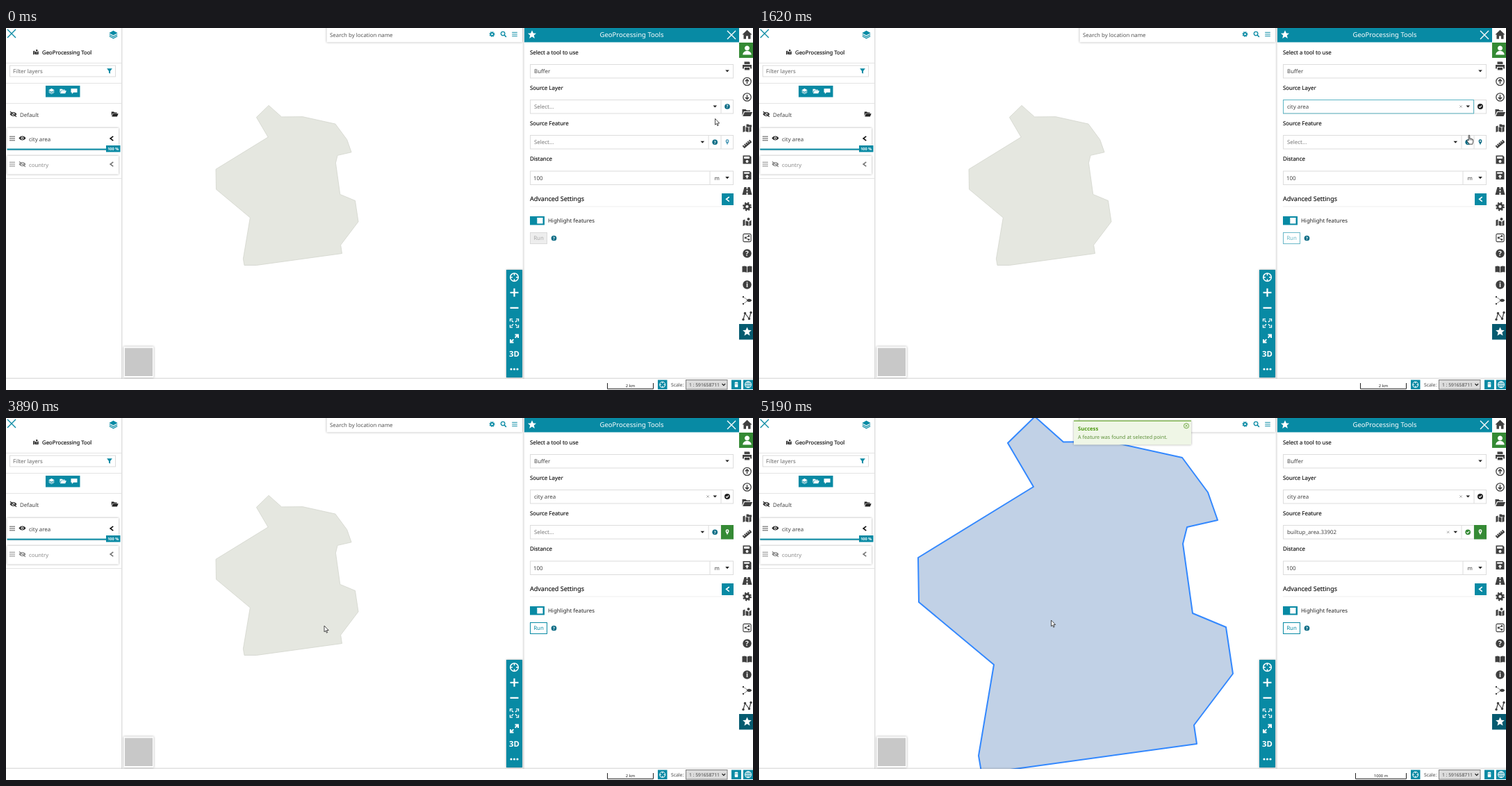
Animation, 1075 px wide and 521 px high, one loop 5.79 s. Source, as an HTML page:

```html
<!DOCTYPE html>
<html lang="en">
<head>
<meta charset="utf-8">
<title>GeoProcessing Tools</title>
<style>
html, body { margin: 0; width: 100%; height: 100%; overflow: hidden; background: #fff; }
svg { display: block; width: 1075px; height: 521px; }
text { font-family: "Noto Sans", "Open Sans", sans-serif; text-rendering: geometricPrecision; }
.soft { filter: drop-shadow(0 .5px 1.5px rgba(0,0,0,.35)); }
</style>
</head>
<body>
<svg id="stage" viewBox="0 0 1075 521"></svg>
<script>
const LOOP = 5790;
const TEAL = '#088aa4', DEEP = '#0b6c85', GREEN = '#358a35', INK = '#404040', EDGE = '#dcdcdc';

const line = (d, w = 1.4) => `<path d="${d}" fill="none" stroke-width="${w}"/>`;
const fill = d => `<path d="${d}"/>`;
const ring = (r, w, extra = '') => `<circle r="${r}" fill="none" stroke-width="${w}" ${extra}/>`;
const glyph = ch => `<text y="3.6" font-size="10" font-weight="700" text-anchor="middle" fill="#fff">${ch}</text>`;

const EYE = 'M-5 0C-2.5-4 2.5-4 5 0 2.5 4-2.5 4-5 0Z';
const FOLDS = 'M-6-3L-3-4V4.5L-6 5.5ZM-2-2L2-1V5.5L-2 4.5ZM3-1L6-3V4.5L3 5.5Z';
const UP = ring(5.7, 1.3) + line('M0 3.2V-3M-2.6-.4L0-3 2.6-.4', 1.5);
const icons = {
  home: fill('M-7 0L0-6.8 7 0H5V6.3H1.5V2H-1.5V6.3H-5V0Z'),
  user: fill('M0-6.5a3.5 3.5 0 1 1-.01 0ZM-6.2 6.5C-6.2-1 6.2-1 6.2 6.5Z'),
  print: fill('M-4-6H3L4-5V-2.4H-4ZM-6.5-1.6H6.5V4H4.6V1.6H-4.6V4H-6.5ZM-3.6 2.6H3.6V6H-3.6Z'),
  up: UP,
  down: `<g transform="rotate(180)">${UP}</g>`,
  folder: fill('M-7 4V-5H-2L-.5-3.5H4.5V-2H-4.5ZM-6.3 5L-3.6-1H7.6L5 5Z'),
  map: fill(FOLDS) + '<circle cx="2" cy="-4.4" r="2"/>',
  mapFolder: fill(FOLDS) + fill('M-1-6H2L3-5H6.5V-2H-1Z'),
  ruler: '<g transform="rotate(-40)">' + fill('M-7-2.3H7V2.3H-7Z') +
    '<path d="M-4.5-2.3V0M-1.5-2.3V0M1.5-2.3V0M4.5-2.3V0" stroke="#fff" stroke-width="1"/></g>',
  save: fill('M-6-6H4L6-4V6H-6ZM-4.3-4.6V-1.4H3.4V-4.6ZM0 .6a2 2 0 1 0 .01 0Z'),
  saveUp: fill('M-6-6H4L6-4V6H-6ZM-4.3-4.6V-2.2H3.4V-4.6ZM0-.8L-3 2H-1V4.6H1V2H3Z'),
  road: fill('M-4-5.5H-.9V-3H.9V-5.5H4L7 5.5H1V2.5H-1V5.5H-7ZM-.8-1.5V1H.8V-1.5Z'),
  gear: ring(3.5, 2.8) + ring(5.5, 1.9, 'stroke-dasharray="2.3 2.02"'),
  share: '<rect x="-5.6" y="-5.6" width="11.2" height="11.2" rx="1.6" fill="none" stroke-width="1.1"/>' +
    line('M2.4-2.6L-2.4 0 2.4 2.6', .9) + '<circle cx="2.4" cy="-2.6" r="1.4"/><circle cx="-2.4" r="1.4"/><circle cx="2.4" cy="2.6" r="1.4"/>',
  help: '<circle r="6.2"/>' + glyph('?'),
  info: '<circle r="6.2"/>' + glyph('i'),
  book: fill('M-7-4C-4-5-2-4.5-.4-3.5V5C-2 4-4 4-7 4.5ZM7-4C4-5 2-4.5 .4-3.5V5C2 4 4 4 7 4.5Z'),
  sight: '<path d="M-5.5-5L0-1M-5.5 5L0 1" fill="none" stroke-width="1" stroke-dasharray="1.6 1"/>' +
    '<circle cx="-5.5" cy="-5" r="1.2"/><circle cx="-5.5" cy="5" r="1.2"/><g transform="translate(3) scale(.75)">' + fill(EYE) + '</g>',
  nodes: line('M-5.5 5L-3-4 3 4 5.5-5', 1.2) +
    [[-5.5, 5], [-3, -4], [3, 4], [5.5, -5]].map(([x, y]) => `<circle cx="${x}" cy="${y}" r="1.7"/>`).join(''),
  star: fill('M0-6.5L1.9-2.2 6.4-1.9 2.9 1.1 4 5.7 0 3.2-4 5.7-2.9 1.1-6.4-1.9-1.9-2.2Z'),
  eye: fill(EYE + 'M0-2a2 2 0 1 0 .01 0ZM0-1a1 1 0 1 1-.01 0Z'),
  eyeOff: fill(EYE + 'M0-2a2 2 0 1 0 .01 0Z') + line('M-4.5-3.8L4.5 3.8', 1.2),
  bars: line('M-4-2.8H4M-4 0H4M-4 2.8H4', 1),
  cross: line('M-6-6L6 6M6-6L-6 6', 1.4),
  back: line('M2.4-3.4L-2 0 2.4 3.4', 1.7),
  caret: fill('M-2.8-1.5H2.8L0 1.6Z'),
  caretUp: fill('M-2.8 1.5H2.8L0-1.6Z'),
  check: '<circle r="6.2"/><path d="M-3 0L-.8 2.3 3.2-2" fill="none" stroke="#fff" stroke-width="1.8"/>',
  pin: fill('M0 4.6C-.6 1.8-2.7.5-2.7-1.7a2.7 2.7 0 0 1 5.4 0C2.7.5.6 1.8 0 4.6ZM0-2.7a1 1 0 1 0 .01 0Z'),
  layers: fill('M0-6L6.5-2.5 0 1-6.5-2.5Z') + line('M-6 0L0 3.2 6 0M-6 2.4L0 5.6 6 2.4', 1.2),
  funnel: fill('M-4.5-4.5H4.5L1.2 0V4.5L-1.2 3V0Z'),
  bubble: fill('M-5-3.5H5V2.5H-1L-3.5 5V2.5H-5Z'),
  lens: '<circle cx="-1" cy="-1" r="3.1" fill="none" stroke-width="1.4"/>' + line('M1.3 1.3L4.3 4.3', 1.7),
  aim: ring(5.8, 1.5) + line('M0-5.8V-2.5M0 5.8V2.5M-5.8 0H-2.5M5.8 0H2.5', 1.5),
  plus: line('M-6 0H6M0-6V6', 2.2),
  minus: line('M-6 0H6', 2.2),
  fit: line('M-6-2.5V-6H-2.5M2.5-6H6V-2.5M6 2.5V6H2.5M-2.5 6H-6V2.5M-4-4L-1.5-1.5M4-4L1.5-1.5M4 4L1.5 1.5M-4 4L-1.5 1.5', 1.4),
  expand: line('M1-5.5H5.5V-1M-1 5.5H-5.5V1M5-5L1.2-1.2M-5 5L-1.2 1.2', 2),
  dots: '<circle cx="-4.5" r="1.6"/><circle r="1.6"/><circle cx="4.5" r="1.6"/>',
  globe: ring(4.4, 1.1) + line('M-4.4 0H4.4M0-4.4V4.4M0-4.4C-3-2-3 2 0 4.4 3 2 3-2 0-4.4', .8)
};

const icon = (name, x, y, s = 1, c = INK) =>
  `<g transform="translate(${x} ${y}) scale(${s})" fill="${c}" stroke="${c}" stroke-width="0" fill-rule="evenodd">${icons[name]}</g>`;
const box = (x, y, x2, y2, f = '#fff', s = 'none', extra = '') =>
  `<rect x="${x}" y="${y}" width="${x2 - x}" height="${y2 - y}" fill="${f}" stroke="${s}" ${extra}/>`;
const label = (x, y, s, size = 7.9, c = '#444', extra = '') =>
  `<text x="${x}" y="${y + size * .35}" font-size="${size}" fill="${c}" ${extra}>${s}</text>`;
const strong = (x, y, s, size = 7.9) => label(x, y, s, size, '#111', 'stroke="#111" stroke-width=".15"');
const rule = (x, y, x2, y2, c = '#e4e4e4', w = 1) => `<path d="M${x} ${y}L${x2} ${y2}" stroke="${c}" stroke-width="${w}"/>`;
const layer = (id, s) => `<g id="${id}">${s}</g>`;
const MID = 'text-anchor="middle"', SOFT = 'class="soft"';

const area = 'M397-2L438 34.5 505 34 609 57 646 107 660 147 616 157 610 181 624 281 672 301 682 368 626 442 630 469 358 506.5 319.5 506.5 316 486 338 355 230 265 229 201 395 99 358 36Z';

const map =
  layer('far', `<path d="${area}" transform="translate(198.4 112.3) scale(.4525)" fill="#e5e7e0" stroke="#d3d5cd" stroke-width="1.8"/>`) +
  layer('near', `<path d="${area}" fill="#c1d1e6" stroke="#3388ff" stroke-width="2" stroke-linejoin="round"/>`) +
  box(169.5, 458.5, 212.5, 503, '#fff', 'none', SOFT) + box(171, 460.5, 211, 501, '#c8c8c8');

const search = box(461.5, -3, 743, 20.5, '#fff', 'none', SOFT) +
  label(466, 10, 'Search by location name', 7.9, '#555') +
  icon('gear', 699.5, 9, .62, TEAL) + icon('lens', 716, 9, .9, TEAL) + icon('bars', 732, 9, .95, TEAL);

const tools = layer('loadTile', box(720, 326, 743, 349, TEAL) +
    '<g transform="translate(731.5 338)"><g id="dots" fill="#fff">' +
    [0, 1, 2, 3, 4, 5].map(i => {
      const a = 1.6 + i * .5;
      return `<circle cx="${(6 * Math.cos(a)).toFixed(2)}" cy="${(6 * Math.sin(a)).toFixed(2)}" r="${.6 + i * .14}"/>`;
    }).join('') + '</g></g>') +
  box(720, 348, 743, 503, TEAL, 'none', SOFT) +
  ['aim', 'plus', 'minus', 'fit', 'expand', '', 'dots'].map((n, i) => n && icon(n, 731.5, 358.7 + i * 22.05, 1, '#fff')).join('') +
  label(731.5, 469, '3D', 11.3, '#fff', MID + ' font-weight="700"');

const left = box(-5, -5, 166, 505, '#fff', 'none', SOFT) +
  icon('cross', 8, 8, 1, TEAL) + icon('layers', 154.5, 9.5, .95, TEAL) +
  icon('map', 43, 35, .62, '#222') + strong(52, 35.3, 'GeoProcessing Tool', 7.75) +
  [50.5, 79.5, 108.5, 216.5].map(y => rule(0, y, 166, y)).join('') +
  box(5.5, 54, 157.5, 70, '#fff', EDGE) + label(10, 62.3, 'Filter layers', 7.9, '#666') + icon('funnel', 149, 62, .85, TEAL) +
  box(57, 83, 106.5, 99.5, TEAL) + icon('layers', 65.5, 91, .65, '#fff') + icon('folder', 82, 91, .65, '#fff') + icon('bubble', 98, 90.5, .9, '#fff') +
  icon('eyeOff', 10.5, 124, 1, '#333') + label(20, 125, 'Default', 7.9) + icon('folder', 156.5, 124, .68, '#222') +
  box(1.5, 144, 162, 175, '#fff', 'none', SOFT) + icon('bars', 9, 159, 1, '#555') + icon('eye', 23.5, 158.5, 1, '#222') +
  label(33, 160, 'city area', 7.9) + layer('chevron', icon('back', 152, 159, .95, '#111')) +
  layer('ring', '<g transform="translate(151.5 158.5)"><g id="arc"><circle r="4" fill="none" stroke="#dfe8ea"/><path d="M0-4A4 4 0 0 1 4 0" fill="none" stroke="#86c3d0"/></g></g>') +
  box(1.5, 173.6, 162, 175.6, TEAL) + box(144, 169, 164.5, 178.5, TEAL) +
  label(154.2, 174, '100 %', 5.6, '#fff', MID + ' font-weight="700"') +
  box(1.5, 184, 162, 210.5, '#fff', 'none', SOFT) + icon('bars', 9, 196, 1, '#888') + icon('eyeOff', 23.5, 196, 1, '#888') +
  label(33, 197, 'country', 7.8, '#8a8a8a') + icon('back', 152, 196, .95, '#777');

const tip = (x, x2, end, s) => box(x, 157.5, x2, 171, '#333', 'none', 'rx="1.5"') +
  `<path d="M${x2} 161.5L${end} 164.2 ${x2} 167Z" fill="#333"/>` + label((x + x2) / 2, 164.3, s, 6.85, '#fff', MID);
const select = y => label(760, y, 'Select...', 7.9, '#777');
const run = (c, f, s) => box(754.5, 294.5, 778.5, 310.5, f, s) + label(766.5, 302.6, 'Run', 7.9, c, MID);

const form = box(745.5, -5, 1055, 505, '#fff', 'none', SOFT) + box(746, 0, 1055, 20.5, TEAL) +
  icon('star', 757, 9.5, .95, '#fff') + label(900.5, 10, 'GeoProcessing Tools', 9.5, '#fff', MID) + icon('cross', 1044, 10, 1, '#fff') +
  strong(754, 35, 'Select a tool to use') + strong(754, 86.3, 'Source Layer') + strong(754, 137.5, 'Source Feature') + strong(754, 188.7, 'Distance') +
  box(754.5, 52.5, 1046.5, 72, '#fff', EDGE) + label(760, 62.3, 'Buffer') + icon('caret', 1038, 62, 1, '#222') +
  box(754.5, 103.5, 1046.5, 123, '#fff', EDGE) + rule(1029, 103.5, 1029, 123, EDGE) +
  layer('focus', box(754.5, 103.5, 1028.5, 123, 'none', '#5db5c4')) +
  layer('layerHint', select(113.3)) + layer('layerHelp', icon('help', 1038, 113, .62, DEEP)) +
  layer('layerSet', label(760, 113.3, 'city area') + icon('cross', 1010, 113, .28, '#333') + icon('check', 1038, 113, .65, '#222')) +
  layer('caretDown', icon('caret', 1020.3, 113, 1, '#222')) + layer('caretOpen', icon('caretUp', 1020.3, 113, 1, '#222')) +
  layer('beam', rule(760.5, 108, 760.5, 118, '#333', .8)) +
  box(754.5, 154.5, 1046.5, 174, '#fff', EDGE) + rule(1011, 154.5, 1011, 174, EDGE) + rule(1029, 154.5, 1029, 174, EDGE) +
  icon('caret', 1002.3, 164.2, 1, '#222') +
  layer('featHint', select(164.4) + icon('help', 1020.2, 164.3, .62, DEEP)) +
  layer('featSet', label(760, 164.4, 'builtup_area.33902') + icon('check', 1020.2, 164.3, .62, GREEN)) +
  layer('featClear', icon('cross', 991.7, 164.3, .28, '#333')) +
  layer('hover', box(1011.5, 155, 1028.5, 173.5, '#d9d9d9') + icon('help', 1020.2, 164.3, .62, '#4c6a72')) +
  layer('pinOff', icon('pin', 1038, 164.3, .9, '#4f9bb8')) + layer('pinOn', icon('pin', 1038, 164.3, .9, DEEP)) +
  layer('pinGreen', box(1029, 154, 1047, 174.5, GREEN)) +
  layer('pinDark', icon('pin', 1038, 164.3, .9, '#17788a')) + layer('pinWhite', icon('pin', 1038, 164.3, .9, '#fff')) +
  box(754.5, 206, 1046.5, 225.5, '#fff', EDGE) + rule(1013, 206, 1013, 225.5, EDGE) +
  label(759, 215.8, '100') + label(1019.5, 215.8, 'm') + icon('caret', 1038, 215.6, 1, '#222') +
  strong(754, 245.7, 'Advanced Settings', 9) + box(1030, 238, 1047, 255, TEAL) + icon('back', 1038.5, 246.3, .95, '#fff') +
  rule(754, 257, 1047, 257, '#efefef') +
  box(754, 271, 775, 283.5, TEAL) + box(764.3, 273, 772.5, 281.5) + label(780, 277.5, 'Highlight features', 7.9, '#222') +
  layer('runOff', run('#aaa', '#ededed', '#dadada')) + layer('runOn', run(TEAL, '#fff', TEAL)) +
  icon('help', 788.5, 302.5, .62, DEEP) +
  layer('menu', box(755, 123.5, 1029, 164.5, '#fff', 'none', SOFT) +
    layer('pickA', box(755, 123.5, 1029, 143.5, '#dedede')) + layer('pickB', box(755, 143.5, 1029, 164.5, '#dedede')) +
    label(760, 133.5, 'country') + label(760, 153.8, 'city area')) +
  layer('tipA', tip(927, 1007, 1011, 'Please select a feature')) +
  layer('tipB', tip(948.5, 1025, 1028.5, 'Click to select feature'));

const railNames = ['home', 'user', 'print', 'up', 'down', 'folder', 'mapFolder', 'ruler', 'save', 'saveUp', 'road', 'gear',
  'map', 'share', 'help', 'book', 'info', 'sight', 'nodes', 'star'];
const rail = box(1055, -2, 1077, 505) + box(1055, 21, 1075, 43, GREEN) + box(1055, 426, 1075, 448.5, '#065b70') +
  railNames.map((n, i) => icon(n, 1066.5, 9.5 + i * 22.5, 1, n === 'user' || n === 'star' ? '#fff' : INK)).join('');

const scale = (id, x, s) => layer(id, `<path d="M${x} 511V519.3H931.5V511" fill="none" stroke="#222"/>` +
  label((x + 931.5) / 2, 515, s, 5.8, '#222', MID));
const foot = box(-5, 505, 1080, 530, '#fff', 'none', SOFT) +
  scale('scaleA', 865.5, '2 km') + scale('scaleB', 864.5, '1000 m') + scale('scaleC', 858.5, '1000 m') +
  box(938, 506.5, 951.5, 520, TEAL) + icon('aim', 944.7, 513.3, .68, '#fff') +
  label(957, 513.8, 'Scale:', 6.8) + box(978.5, 506.5, 1038, 520, '#dcdcdc', '#808080') + label(983, 513.6, '1 : 591658711', 6.75) +
  `<path d="M1030.5 512L1032.8 514.4 1035.1 512" fill="none" stroke="#222" stroke-width="1.2"/>` +
  box(1044, 506.5, 1058, 520, TEAL) + box(1048.7, 509.5, 1053.3, 517, '#fff', 'none', 'rx="1"') + rule(1048.7, 512, 1053.3, 512, TEAL, .7) +
  box(1061, 506.5, 1075, 520, TEAL) + icon('globe', 1068, 513.3, 1, '#fff');

const toast = layer('toast', box(453, 4, 622, 38.5, '#eff6e6', 'none', SOFT) + box(453, 3.6, 622, 4.8, '#6cab32') +
  label(459, 15.3, 'Success', 7.65, '#4f9a14', 'font-weight="700"') +
  label(459, 27.2, 'A feature was found at selected point.', 7.25, '#5c8f38') +
  `<g transform="translate(615 11.3)" stroke="#69a33a" fill="none" stroke-width=".9"><circle r="3.6"/><path d="M-1.5-1.5L1.5 1.5M1.5-1.5L-1.5 1.5"/></g>`);

const pointer = layer('arrow', '<path d="M0 0V8.8L2 7 3.3 10.2 4.7 9.6 3.4 6.5H6.2Z" fill="#fff" stroke="#222" stroke-width=".8"/>') +
  layer('hand', '<path d="M2.6 8V1.2C2.6-.2 4.3-.2 4.3 1.2V5C5.8 4.6 6 5.2 6.1 5.5 7.2 5.1 7.6 5.6 7.7 6.1 8.8 5.9 9.2 6.5 9.2 7.3V9.6C9.2 11.2 8.4 11.8 8.3 13.2H3.4C3 11.4.9 9.8.3 8.1 0 7 1.3 6.7 2.6 8Z" fill="#fff" stroke="#222" stroke-width=".85"/><path d="M4.3 5V7.5M6.1 5.5V7.7M7.7 6.1V7.9" stroke="#222" stroke-width=".6"/>');

document.getElementById('stage').innerHTML = map + search + tools + left + form + rail + foot + toast + pointer;
const el = {};
document.querySelectorAll('#stage [id]').forEach(n => el[n.id] = n);

// Each entry holds [time, opacity] steps; opacity is 0 before the first.
const steps = {
  far: [[0, 1], [4630, 0]], near: [[4630, 1]],
  focus: [[1540, 1], [2600, 0]],
  layerHint: [[0, 1], [1540, 0]], layerHelp: [[0, 1], [1540, 0]], layerSet: [[1540, 1]],
  caretDown: [[0, 1], [320, 0], [1540, 1]], caretOpen: [[320, 1], [1540, 0]],
  beam: [[320, 1], [850, 0], [1380, 1], [1540, 0]],
  menu: [[320, 1], [1540, 0]], pickA: [[320, 1], [980, 0]], pickB: [[980, 1]],
  featHint: [[0, 1], [4490, 0]], featSet: [[4490, 1]], featClear: [[4490, .4], [4630, 1]],
  hover: [[2060, 1], [2270, 0]],
  pinOff: [[0, 1], [1610, 0]], pinOn: [[1610, 1], [2600, 0]],
  pinGreen: [[2600, .6], [2670, 1]], pinDark: [[2600, 1], [3470, 0]], pinWhite: [[3470, 1]],
  runOff: [[0, 1], [1610, 0]], runOn: [[1610, .6], [1680, 1]],
  tipA: [[2060, .5], [2130, .95], [2200, .85], [2270, .3], [2330, 0]],
  tipB: [[2270, .4], [2330, .8], [2400, 1], [3470, .5], [3540, 0]],
  chevron: [[0, 1], [4630, 0], [4900, 1]], ring: [[4630, 1], [4900, 0]], loadTile: [[4630, 1], [4900, 0]],
  scaleA: [[0, 1], [4630, 0]], scaleB: [[4630, 1], [4690, 0]], scaleC: [[4690, 1]],
  toast: [[4760, .3], [4830, .65], [4900, .9], [4980, 1]]
};

// time, x, y, hand
const moves = [
  [0, 1020.5, 130.5], [50, 1018, 124], [120, 1015.8, 118.5],
  [780, 1016.5, 122], [850, 1017, 129, 1], [920, 1017.5, 136, 1], [980, 1018, 141, 1], [1110, 1018, 143.5, 1],
  [1240, 1018.5, 151, 1], [1310, 1018.5, 154, 1],
  [2060, 1021, 158, 1], [2130, 1025, 162, 1], [2200, 1029, 165, 1], [2270, 1032, 166.5, 1], [2330, 1034, 167, 1],
  [3400, 1011, 172.5], [3470, 958, 212], [3540, 884, 256], [3610, 797, 291], [3680, 702, 309], [3750, 609, 313],
  [3820, 526, 309], [3890, 458, 299], [3970, 419, 289],
  [4020, 414, 285], [4090, 418, 288.5], [4160, 420.5, 291]
];

const at = (list, t) => {
  let hit = null;
  for (const k of list) if (k[0] <= t) hit = k;
  return hit;
};

const start = performance.now();
function draw() {
  const t = Math.max(0, performance.now() - start) % LOOP;
  for (const id in steps) {
    const k = at(steps[id], t);
    el[id].setAttribute('opacity', k ? k[1] : 0);
  }
  const [, x, y, hand] = at(moves, t);
  el.arrow.setAttribute('opacity', hand ? 0 : 1);
  el.hand.setAttribute('opacity', hand ? 1 : 0);
  for (const id of ['arrow', 'hand']) el[id].setAttribute('transform', `translate(${x} ${y})`);
  const spin = Math.floor((t - 4630) / 65) * 30;
  el.dots.setAttribute('transform', `rotate(${spin})`);
  el.arc.setAttribute('transform', `rotate(${spin})`);
  requestAnimationFrame(draw);
}
draw();
</script>
</body>
</html>
```
